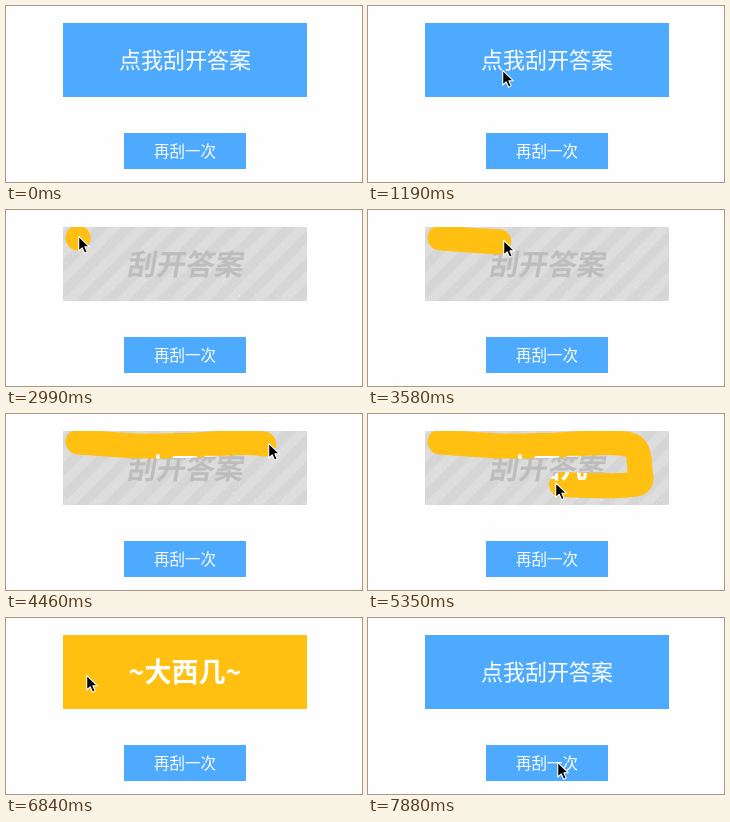
Recreate the animation shown at these times as an HTML page. Size 356 by 176 pixels, loop 8 s.

```html
<!DOCTYPE html>
<html lang="zh-CN">
<head>
<meta charset="utf-8">
<title>刮刮卡</title>
<style>
  html, body { margin: 0; width: 100%; height: 100%; overflow: hidden; background: #fefefe; }
  svg { display: block; width: 356px; height: 176px; }
  text {
    font-family: "Noto Sans CJK SC", "Noto Sans CJK", "Noto Sans", sans-serif;
    font-weight: 300;
    text-anchor: middle;
    fill: #fff;
  }
  .blue { fill: #4eaaff; }
  .yellow { fill: #ffc011; }
  .bold { font-weight: 700; }
  .gray { fill: #bdbdbd; }
</style>
</head>
<body>
<svg viewBox="0 0 356 176" xmlns="http://www.w3.org/2000/svg">
  <defs>
    <pattern id="stripes" width="19" height="19" patternUnits="userSpaceOnUse" patternTransform="translate(62 17) rotate(45)">
      <rect width="19" height="19" fill="#dddddd"/>
      <rect width="9.5" height="19" fill="#d6d6d6"/>
    </pattern>
    <mask id="scratched" maskUnits="userSpaceOnUse" x="57" y="17" width="244" height="74">
      <rect x="57" y="17" width="244" height="74" fill="#fff"/>
      <polyline id="trail" transform="translate(0 2)" fill="none" stroke="#000" stroke-width="25"
        stroke-linecap="round" stroke-linejoin="round"/>
    </mask>
  </defs>

  <g id="answer">
    <rect class="yellow" x="57" y="17" width="244" height="74"/>
    <text class="bold" x="179" y="64" font-size="27">~大西几~</text>
  </g>
  <g id="foil" mask="url(#scratched)">
    <rect x="57" y="17" width="244" height="74" fill="url(#stripes)"/>
    <path id="grain" stroke="#fff" stroke-opacity=".25" fill="none"/>
    <text class="bold gray" transform="translate(178.5 64.5) skewX(-10)" font-size="29">刮开答案</text>
  </g>
  <g id="start">
    <rect class="blue" x="57" y="17" width="244" height="74"/>
    <text x="179" y="62" font-size="22">点我刮开答案</text>
  </g>

  <rect class="blue" x="118" y="127" width="122" height="36"/>
  <text x="179" y="150.5" font-size="15.5">再刮一次</text>

  <path id="cursor" d="M.7 .3V15L4.2 11.8 6.6 17.2 9.2 16.1 6.9 10.8H11.5Z"
    fill="#000" stroke="#fff" stroke-width="1.1" stroke-linejoin="round"/>
</svg>
<script>
  const LOOP = 8000;
  const BEAT = 148.6; // the picture changes only on whole beats
  const LAG = 0.25;   // beats the scratch trails behind the pointer
  const el = id => document.getElementById(id);

  // Pointer strokes, as key points of beat, x, y
  const hover = [[6, 130, 61], [8, 134, 64]];
  const approach = [[16, 134, 64], [18, 92, 39], [20, 72, 26]];
  const scratch = [
    [20, 72, 26], [24, 135, 30], [26, 175, 29.5], [30, 262, 29],
    [32, 272, 55], [33, 268, 68], [36, 187, 68.5], [38, 141, 66]
  ];
  const leave = [[42, 141, 67], [44, 108, 62], [46, 80, 57]];
  const press = [[48, 80, 57], [51, 189, 144]];
  const strokes = [hover, approach, scratch, leave, press];

  // Smooth curve through the key points, held at both ends
  function follow(keys, beat) {
    const last = keys.length - 1;
    const b = Math.min(Math.max(beat, keys[0][0]), keys[last][0]);
    const i = Math.max(0, keys.findIndex(k => k[0] >= b) - 1);
    const [p, q] = [keys[i], keys[i + 1]];
    const span = q[0] - p[0];
    const u = (b - p[0]) / span;
    const slope = (j, axis) => {
      const from = keys[Math.max(j - 1, 0)], to = keys[Math.min(j + 1, last)];
      return (to[axis] - from[axis]) / (to[0] - from[0]) * span;
    };
    return [1, 2].map(axis => {
      const ease = u * u * (3 - 2 * u);
      return p[axis] + (q[axis] - p[axis]) * ease
        + slope(i, axis) * u * (1 - u) ** 2
        - slope(i + 1, axis) * u * u * (1 - u);
    });
  }

  let seed = 7;
  const random = () => (seed = seed * 16807 % 2147483647) / 2147483647;
  let grain = '';
  for (let i = 0; i < 240; i++) {
    grain += `M${58 + Math.floor(random() * 241)} ${18.5 + Math.floor(Math.sqrt(random()) * 72)}h1`;
  }
  el('grain').setAttribute('d', grain);

  const show = (id, on) => el(id).style.display = on ? '' : 'none';

  function draw(t) {
    const beat = Math.floor((t + 10) / BEAT);
    show('start', beat < 14 || beat >= 53);
    show('foil', beat >= 14 && beat < 43);

    const stroke = strokes.filter(keys => keys[0][0] <= beat).pop();
    show('cursor', stroke);
    if (stroke) el('cursor').setAttribute('transform', `translate(${follow(stroke, beat)})`);

    const points = [];
    const first = scratch[0][0];
    const end = beat >= 38 ? 38 : beat - LAG;
    if (beat >= first) {
      for (let b = first; b < end; b += 0.1) points.push(follow(scratch, b));
      points.push(follow(scratch, Math.max(end, first + 0.01)));
      if (points.length === 1) points.unshift(follow(scratch, first));
    }
    el('trail').setAttribute('points', points.join(' '));
  }

  const begin = performance.now();
  function tick() {
    draw((performance.now() - begin) % LOOP);
    requestAnimationFrame(tick);
  }
  tick();
</script>
</body>
</html>
```
